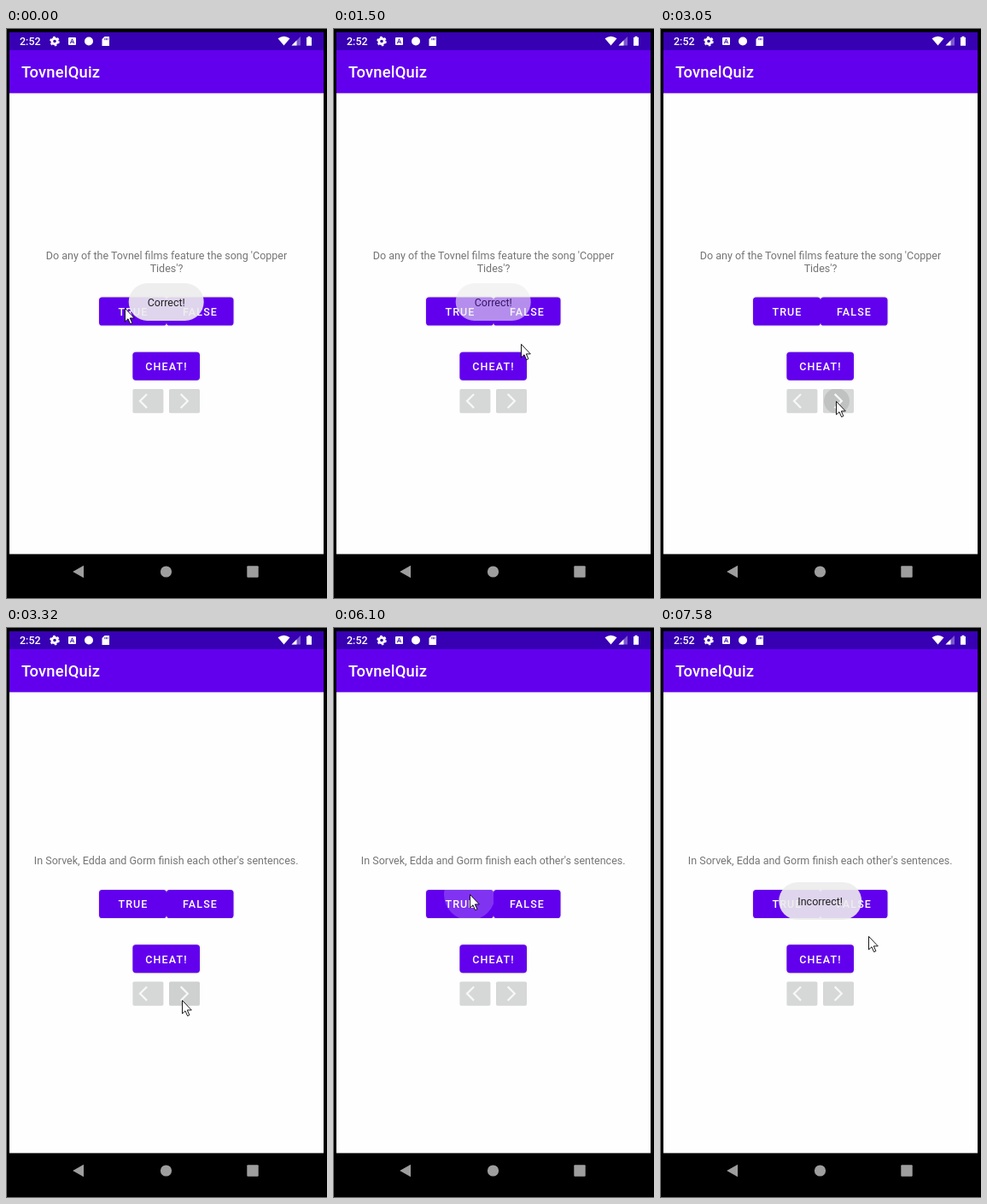
An HTML page that plays this animation: 376x669 px, repeating every 8 s.

```html
<!DOCTYPE html>
<html lang="en">
<head>
<meta charset="utf-8">
<title>Quiz app</title>
<style>
  html, body { margin: 0; width: 100%; height: 100%; overflow: hidden; background: #000; }
  svg { display: block; width: 376px; height: 669px; }
  text { font: 400 12.5px Roboto, sans-serif; }
  .mid { text-anchor: middle; }
  .title { font-size: 18.4px; font-weight: 500; letter-spacing: .01em; fill: #fff; }
  .clock { font-weight: 500; fill: #fff; }
  .question { fill: #757575; }
  .label { font-weight: 500; letter-spacing: .0893em; fill: #fff; }
  .raised { fill: #6200ee; }
  .shadow { filter: drop-shadow(0 .8px .8px rgba(0, 0, 0, .22)); }
  .flat { fill: #d6d7d7; }
  .icon { fill: #f7f7f7; }
</style>
</head>
<body>
<svg viewBox="0 0 376 669">
  <defs>
    <clipPath id="trueClip"><rect x="109" y="315.5" width="79" height="33" rx="3.6"/></clipPath>
    <clipPath id="nextClip"><rect x="191" y="423" width="36" height="28.3" rx="1.8"/></clipPath>
  </defs>

  <rect width="376" height="669" fill="#000"/>
  <path d="M376 .5H.5V668.5H376" fill="none" stroke="#777"/>
  <rect x="4" y="76" width="368" height="540.4" fill="#fefefe"/>
  <rect x="4" y="26" width="368" height="50.4" fill="#6200ee"/>
  <rect x="4" y="5" width="368" height="21" fill="#3700b3"/>

  <!-- status bar -->
  <text class="clock" x="16" y="20">2:52</text>
  <g fill="#fff">
    <circle cx="57" cy="15.5" r="3.2" fill="none" stroke="#fff" stroke-width="2.8"/>
    <circle cx="57" cy="15.5" r="4.9" fill="none" stroke="#fff" stroke-width="1.8" stroke-dasharray="2.57 2.57"/>
    <rect x="73" y="11" width="9" height="9" rx="1"/>
    <path d="M75.3 18.2 77.5 12.8 79.7 18.2M76.1 16.5h2.8" fill="none" stroke="#3700b3" stroke-width=".9"/>
    <circle cx="97" cy="15.5" r="5"/>
    <path d="M115.5 10h5.5v11h-8.5v-8z"/>
    <path d="M115.8 12v2.2M117.5 12v2.2M119.2 12v2.2" stroke="#3700b3" stroke-width=".8"/>
    <path d="M318.5 12.3Q325.5 7.3 332.5 12.3L325.5 20.5z"/>
    <path d="M345 10v10.5h-10.5z" opacity=".35"/>
    <path d="M340.5 14.5v6h-6z"/>
    <path d="M352 11h1.5v-1.2h3V11h1.5v9.8h-6z"/>
  </g>
  <text class="title" x="18" y="58">TovnelQuiz</text>

  <g id="first">
    <text class="question mid" x="188" y="271">Do any of the Tovnel films feature the song 'Copper</text>
    <text class="question mid" x="188" y="285.5">Tides'?</text>
  </g>
  <text id="second" class="question mid" x="187.7" y="278">In Sorvek, Edda and Gorm finish each other's sentences.</text>

  <g id="controls">
    <g class="shadow">
      <rect class="raised" x="109" y="315.5" width="79" height="33" rx="3.6"/>
      <rect class="raised" x="188" y="315.5" width="78.5" height="33" rx="3.6"/>
      <rect class="raised" x="148.4" y="379.7" width="78.6" height="33" rx="3.6"/>
    </g>
    <circle id="trueRipple" cx="160" cy="321" fill="#fff" clip-path="url(#trueClip)"/>
    <text class="label mid" x="149" y="336.5">TRUE</text>
    <text class="label mid" x="227.5" y="336.5">FALSE</text>
    <text class="label mid" x="188" y="401.3">CHEAT!</text>
    <rect class="flat" x="148.4" y="423" width="36" height="28.3" rx="1.8"/>
    <rect class="flat" x="191" y="423" width="36" height="28.3" rx="1.8"/>
    <circle id="nextRipple" cx="207" cy="437" fill="#000" clip-path="url(#nextClip)"/>
    <path class="icon" transform="translate(155.4 426.3) scale(.895)" d="M11.67 3.87 9.9 2.1 0 12l9.9 9.9 1.77-1.77L3.54 12z"/>
    <path class="icon" transform="translate(198.3 426.3) scale(.895)" d="M6.23 20.23 8 22 18 12 8 2 6.23 3.77 14.46 12z"/>
  </g>

  <g id="toast">
    <rect id="pill" y="299" height="44" rx="22" fill="#ededed" opacity=".9"/>
    <text id="verdict" class="mid" x="187.7" y="326" fill="#222"></text>
  </g>

  <!-- navigation bar -->
  <g fill="#9e9e9e">
    <path d="M78.2 637 91 629.8v14.4z"/>
    <circle cx="187.5" cy="637" r="6.6"/>
    <rect x="282.3" y="630.3" width="13.4" height="13.4" rx="1"/>
  </g>

  <path id="cursor" d="M.5.5V16L4 12.8 6.6 18.7 8.9 17.7 6.3 11.9H11.3z" fill="#fff" stroke="#000" stroke-width=".9"/>
</svg>

<script>
const LOOP = 8000, BEAT = 120;
const TURN = 3200, LEAVE = 5130, HIDE = 1500, SHOW = 6370;
const $ = id => document.getElementById(id);

// Mouse moves: start time, length in beats, end point.
const origin = [139, 328];
const moves = [
  [650, 2, 232, 424], [920, 2, 208, 442], [1340, 1, 220, 319], [1500, 1, 220, 370],
  [1650, 1, 230, 330], [2080, 3, 208, 409], [2500, 3, 206, 437],
  [LEAVE, 1, 200, 418], [5250, 4, 160, 313], [7310, 3, 244, 362]
];

// Progress 0..1 that jumps once per beat, the first time at the start itself.
const stepped = (t, start, beats) =>
  Math.min(beats, Math.max(0, Math.floor((t - start) / BEAT) + 1)) / beats;
const easeOut = p => 1 - (1 - p) ** 2;
const lerp = (a, b, p) => a + (b - a) * p;

function pointer(t) {
  let [x, y] = origin;
  for (const [start, beats, toX, toY] of moves) {
    const p = easeOut(stepped(t, start, beats));
    x = lerp(x, toX, p);
    y = lerp(y, toY, p);
  }
  return [x, y];
}

function ripple(id, grow, size, strong, rest) {
  $(id).setAttribute("r", size * grow);
  $(id).setAttribute("opacity", lerp(strong, rest, grow));
}

function draw(t) {
  const later = t >= TURN;
  $("first").style.display = later ? "none" : "";
  $("second").style.display = later ? "" : "none";
  $("controls").setAttribute("transform", `translate(0 ${later ? -7.5 : 0})`);

  const width = later ? 97 : 88;
  $("pill").setAttribute("x", 187.7 - width / 2);
  $("pill").setAttribute("width", width);
  $("verdict").textContent = later ? "Incorrect!" : "Correct!";
  $("toast").setAttribute("opacity", 1 - stepped(t, HIDE, 3) + stepped(t, SHOW, 4));

  ripple("nextRipple", stepped(t, 3050, 3), 45, .135, t < LEAVE ? .03 : 0);
  ripple("trueRipple", stepped(t, 6100, 3), 90, .3, 0);
  $("cursor").setAttribute("transform", `translate(${pointer(t)})`);
}

function tick() {
  draw(performance.now() % LOOP);
  requestAnimationFrame(tick);
}
tick();
</script>
</body>
</html>
```
